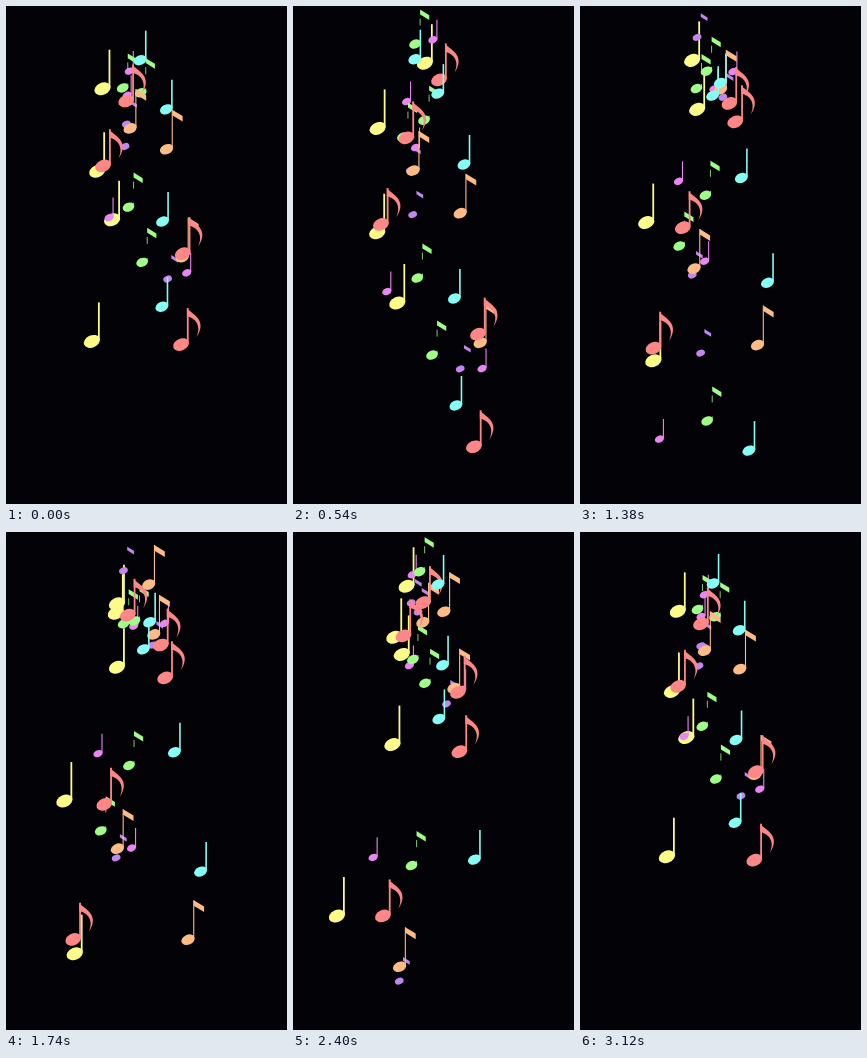
An HTML page with a canvas for the animation above (3180 ms loop, 281x498 px).

```html
<!DOCTYPE html>
<html lang="en">
<head>
<meta charset="utf-8">
<title>Falling notes</title>
<style>
  html, body { margin: 0; width: 100%; height: 100%; overflow: hidden; background: #030206; }
  canvas { display: block; }
</style>
</head>
<body>
<canvas width="281" height="498"></canvas>
<script>
const ctx = document.querySelector('canvas').getContext('2d');
// seconds: loop, life of a note, gap between births of one kind, picture step
const LOOP = 3.18, LIFE = 3.56, GAP = 0.72, STEP = 0.06;
const GRAVITY = 56; // px/s²

// r: head radius, h: stem height, w: stem width, birth: first birth (s), push: start speed (px/s)
// paths: one per note, in order of birth: [start x, end x, start y]
const kinds = [
  { color: '#fdfb88', r: 8.4, h: 39, w: 1.8, birth: 0.13, push: 8.5,
    paths: [[139, 77, 49], [114, 102, 42], [112, 66, 79], [116, 38, 53]] },
  { color: '#c385f0', r: 4.5, h: 24, w: 0, birth: 0.62, push: 8, end: flag,
    paths: [[135, 172, 69], [117, 121, 31], [127, 106, 74]] },
  { color: '#ea86f3', r: 4.8, h: 20, w: 1.1, birth: 0.48, push: 11,
    paths: [[139, 194, 33], [137, 76, 80], [118, 127, 31], [133, 69, 51]] },
  { color: '#a0fd88', r: 6.1, h: 34.5, w: 0.8, dash: [0, 9, 7, 5], birth: 0.53, push: 8.2, end: flag,
    paths: [[122, 141, 38], [116, 128, 81], [132, 87, 31], [138, 114, 76]] },
  { color: '#fdbc86', r: 6.9, h: 39.5, w: 1.1, birth: 0.8, push: 10.3, end: flag,
    paths: [[129, 200, 68], [140, 184, 49], [131, 105, 88]] },
  { color: '#fd8686', r: 8.2, h: 36.5, w: 1.8, birth: 0.17, push: 5.6, end: curl,
    paths: [[142, 181, 68], [142, 196, 88], [124, 63, 82], [131, 86, 70]] },
  { color: '#85fdf4', r: 6.7, h: 29.5, w: 1.6, birth: 0.4, push: 12,
    paths: [[120, 166, 51], [138, 170, 72], [134, 204, 37], [122, 192, 36]] }
];

function flag(r) {
  ctx.moveTo(0, 0);
  ctx.lineTo(1.5 * r, 0.92 * r);
  ctx.lineTo(1.5 * r, 1.72 * r);
  ctx.lineTo(0, 0.8 * r);
}

function curl() {
  ctx.moveTo(-0.9, 0);
  ctx.bezierCurveTo(3, 6, 21, 11, 8.5, 29.5);
  ctx.bezierCurveTo(14, 18, 8, 10, -0.9, 8.5);
}

function drawNote({ color, r, h, w, dash = [], end }, x, y) {
  ctx.save();
  ctx.translate(x, y);
  ctx.fillStyle = ctx.strokeStyle = color;
  ctx.beginPath();
  ctx.ellipse(0, 0, r, 0.72 * r, -0.42, 0, 2 * Math.PI);
  ctx.fill();
  ctx.translate(0.83 * r, -h);
  if (w) {
    ctx.lineWidth = w;
    ctx.setLineDash(dash);
    ctx.beginPath();
    ctx.moveTo(0, 0);
    ctx.lineTo(0, h - 1);
    ctx.stroke();
  }
  if (end) {
    ctx.beginPath();
    end(r);
    ctx.fill();
  }
  ctx.restore();
}

function frame(now) {
  const t = Math.floor(now / 1000 / STEP) * STEP % LOOP;
  ctx.fillStyle = '#030206';
  ctx.fillRect(0, 0, 281, 498);
  for (const kind of kinds) {
    kind.paths.forEach(([x0, x1, y0], i) => {
      const birth = kind.birth + GAP * i;
      // a note outlives one loop, so its older copy may still be falling
      for (let age = (t - birth + LOOP) % LOOP; age < LIFE; age += LOOP) {
        const x = x0 + (x1 - x0) * age / LIFE;
        const y = y0 + kind.push * age + GRAVITY * age * age / 2;
        drawNote(kind, x, y);
      }
    });
  }
}

const start = performance.now();
function tick() {
  frame(performance.now() - start);
  requestAnimationFrame(tick);
}
tick();
</script>
</body>
</html>
```
